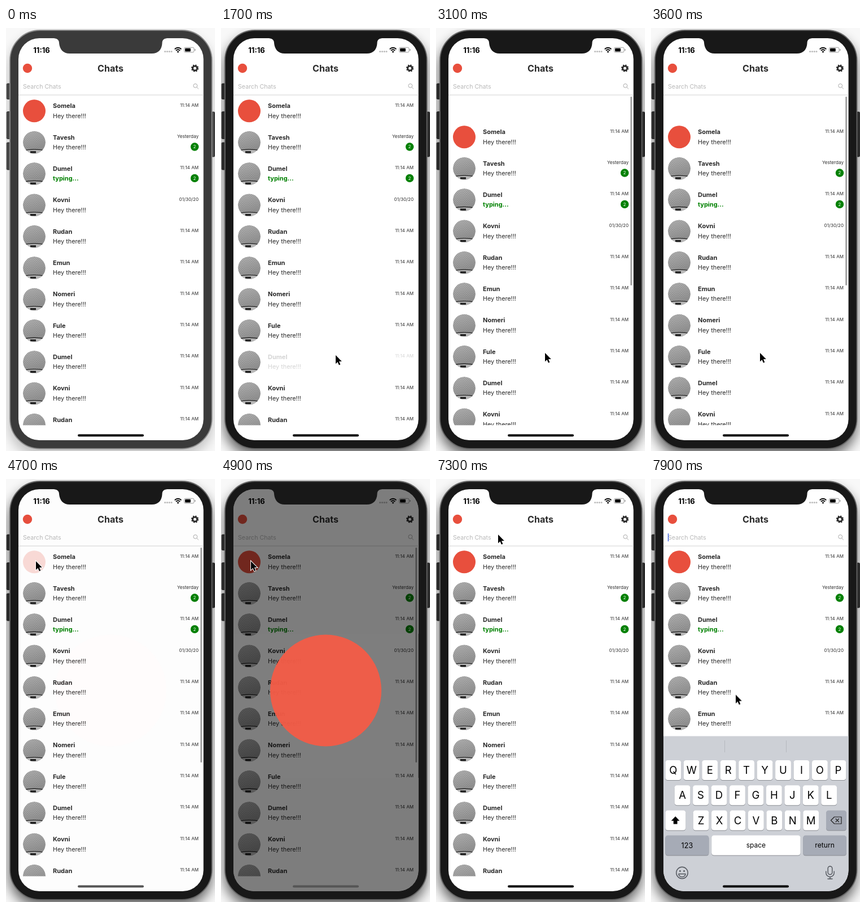
An HTML page that plays this animation: 370x746 px, repeating every 8000 ms.

```html
<!DOCTYPE html>
<html lang="en">
<head>
<meta charset="utf-8">
<title>Chats</title>
<style>
@property --s { syntax: "<length>"; inherits: true; initial-value: 0px; }
html, body { margin: 0; width: 100%; height: 100%; overflow: hidden; background: #f8f8f8; }
svg { display: block; width: 100vw; height: 100vh; font-family: Inter, Roboto, sans-serif; fill: #2a2a2a; }
.anim { animation: 8s linear infinite; }

.shadow { filter: blur(11px); animation-name: shadow; }
.body { animation-name: body; }
.side { animation-name: side; }
.glass { animation-name: glass; }
.scroll { animation-name: scroll; }
.list { transform: translateY(var(--s)); }
.bar { y: calc(121px + max(0px, var(--s) * -.65)); height: calc(379px - max(0px, var(--s))); animation-name: bar; }
.press { animation-name: press; }
.tap { animation-name: tap; }
.modal { animation-name: modal; }
.home { animation-name: home; }
.keys { animation-name: keys; }
.caret { animation-name: caret; }
.cursor { animation-name: move, show; paint-order: stroke; }

.name { font-size: 11px; font-weight: 700; }
.msg { font-size: 10.8px; }
.typing { font-size: 11px; font-weight: 700; fill: #008000; }
.time { font-size: 8px; letter-spacing: .06px; text-anchor: end; }
.badge { font-size: 8px; fill: #fff; text-anchor: middle; }
.key { text-anchor: middle; fill: #000; }

/* window gains focus */
@keyframes shadow { 0%, 15% { opacity: .24 } 15.01%, 100% { opacity: .62 } }
@keyframes body { 0%, 15% { fill: #3a3a3a; stroke: #8c8c8c } 15.01%, 100% { fill: #181818; stroke: #666 } }
@keyframes side { 0%, 15% { fill: #484848 } 15.01%, 100% { fill: #2a2a2a } }
@keyframes glass { 0%, 15% { fill: #3a3a3a } 15.01%, 100% { fill: #181818 } }

@keyframes scroll {
  0%, 21.9% { --s: 0px }
  26.9% { --s: -120px; animation-timing-function: ease-out }
  30.6%, 31.25% { --s: -151px }
  35.5% { --s: 0px; animation-timing-function: ease-out }
  38.1%, 45.6% { --s: 46px; animation-timing-function: cubic-bezier(.2, .7, .3, 1) }
  52%, 100% { --s: 0px }
}
@keyframes bar { 0%, 22% { opacity: 0 } 23%, 61.5% { opacity: 1 } 65%, 100% { opacity: 0 } }
@keyframes press { 0%, 20% { opacity: 1 } 21%, 22.5% { opacity: .2 } 24.4%, 100% { opacity: 1 } }
@keyframes tap { 0%, 57% { opacity: 1 } 58%, 59% { opacity: .2 } 61.2%, 100% { opacity: 1 } }
@keyframes modal {
  0%, 58.46% { opacity: 0; animation-timing-function: ease-in-out }
  61.6%, 71% { opacity: 1; animation-timing-function: ease-in-out }
  74.7%, 100% { opacity: 0 }
}
@keyframes home { 0%, 58.4% { fill: #000 } 58.7%, 71% { fill: #555 } 73%, 100% { fill: #000 } }
@keyframes keys {
  0%, 92.7% { transform: translateY(280px); animation-timing-function: cubic-bezier(.2, .8, .3, 1) }
  97.3%, 100% { transform: none }
}
@keyframes caret { 0%, 93% { opacity: 0 } 93.01%, 100% { opacity: 1 } }
@keyframes show { 0%, 1.24% { opacity: 0 } 1.25%, 100% { opacity: 1 } }
@keyframes move {
  0%, 1.25% { transform: translate(328px, 597px) }
  3.75%, 6.25% { transform: translate(254px, 614px) }
  8.75%, 11.25% { transform: translate(220px, 539px) }
  15%, 21.9% { transform: translate(203px, 577px) }
  26.9% { transform: translate(203px, 430px) }
  30%, 31.25% { transform: translate(193px, 330px) }
  38.1%, 45.6% { transform: translate(193px, 573px); animation-timing-function: ease-in-out }
  56.25%, 65% { transform: translate(53px, 145px); animation-timing-function: ease-in-out }
  70%, 79.4% { transform: translate(156.5px, 153.5px); animation-timing-function: ease-in-out }
  89.4%, 93.1% { transform: translate(110px, 98px); animation-timing-function: ease-in-out }
  98.1%, 100% { transform: translate(150px, 380.5px) }
}
</style>
</head>
<body>
<svg viewBox="0 0 370 746" preserveAspectRatio="none">
  <defs>
    <clipPath id="screen"><rect x="22" y="18" width="327.6" height="709" rx="37"/></clipPath>
    <clipPath id="view"><rect x="22" y="118.5" width="328" height="582"/></clipPath>
    <clipPath id="disc"><circle r="20"/></clipPath>
    <linearGradient id="grey" x1="0" y1="0" x2=".3" y2="1">
      <stop offset="0" stop-color="#bcbcbc"/><stop offset="1" stop-color="#949494"/>
    </linearGradient>
    <pattern id="mesh" width="3.2" height="4" patternUnits="userSpaceOnUse">
      <circle cx=".8" cy="1" r=".75" fill="#555"/><circle cx="2.4" cy="3" r=".75" fill="#555"/>
    </pattern>
    <g id="photo" clip-path="url(#disc)">
      <circle r="20" fill="url(#grey)"/>
      <circle r="20" fill="url(#mesh)" opacity=".65"/>
      <path d="M-20 14.5Q0 10.5 20 14.5V20H-20Z" fill="#b8b8b8"/>
      <path d="M-20 14.5Q0 10.5 20 14.5" fill="none" stroke="#222" stroke-width="1.3"/>
      <path d="M-7 15.6H3V18.8H-7Z" fill="#1c1c1c"/>
    </g>
  </defs>

  <rect width="370" height="746" fill="#f8f8f8"/>
  <rect class="anim shadow" x="6" y="16" width="358" height="738" rx="54" fill="#000"/>
  <g class="anim side" stroke="#111" stroke-width=".7">
    <rect x="1.3" y="98" width="8" height="27.5" rx="1.5"/>
    <rect x="1.3" y="147.5" width="8" height="48" rx="1.5"/>
    <rect x="1.3" y="202" width="8" height="48" rx="1.5"/>
    <rect x="361" y="148" width="8.5" height="79" rx="1.5"/>
  </g>
  <rect class="anim body" x="7" y="4" width="357.5" height="738" rx="53" stroke-width="1.8"/>

  <g clip-path="url(#screen)">
    <rect x="22" y="18" width="328" height="710" fill="#fff"/>

    <text x="63" y="43.5" text-anchor="middle" font-size="13" font-weight="700" fill="#000">11:16</text>
    <g fill="#bbb"><circle cx="281.6" cy="41.5" r="1.5"/><circle cx="285.4" cy="41.5" r="1.5"/><circle cx="289.2" cy="41.5" r="1.5"/><circle cx="293" cy="41.5" r="1.5"/></g>
    <g fill="none" stroke="#000" stroke-width="1.9">
      <path d="M298.7 37.3a8 8 0 0 1 11.6 0M300.9 39.8a5 5 0 0 1 7.2 0"/>
    </g>
    <path d="M302.4 41.7a3 3 0 0 1 4.2 0L304.5 43.8Z" fill="#000"/>
    <rect x="315.5" y="34.3" width="17.4" height="8.6" rx="2.4" fill="none" stroke="#999" stroke-width="1"/>
    <rect x="317" y="35.8" width="9.8" height="5.6" rx="1" fill="#000"/>
    <path d="M334 37a1.6 1.6 0 0 1 0 3.2Z" fill="#999"/>

    <circle cx="38" cy="71" r="8.2" fill="#e84f3d"/>
    <text x="185" y="77" text-anchor="middle" font-size="16" font-weight="650">Chats</text>
    <g fill="none" stroke="#2a2a2a">
      <circle cx="334.4" cy="71" r="3.9" stroke-width="2.8"/>
      <circle cx="334.4" cy="71" r="5.5" stroke-width="2.2" stroke-dasharray="2.4 1.92"/>
    </g>
    <text x="30" y="107.2" font-size="10.7" fill="#b9b9b9">Search Chats</text>
    <g fill="none" stroke="#aaa" stroke-width="1"><circle cx="335.2" cy="101.8" r="3.4"/><path d="M337.7 104.3L340.8 107.4"/></g>
    <rect class="anim caret" x="29.8" y="96" width="1.5" height="14" fill="#4668e0"/>
    <rect x="22" y="117.6" width="328" height="1" fill="#d4d4d4"/>

    <g class="anim scroll">
      <g clip-path="url(#view)"><g class="list" id="list"></g></g>
      <rect class="anim bar" x="344.3" width="2.6" rx="1.3" fill="#999"/>
    </g>

    <g class="anim keys" id="keys">
      <rect x="22" y="453.5" width="328" height="280" fill="#cdd0d6"/>
      <path d="M130.5 461V482M239.5 461V482" stroke="#b6b9bf" stroke-width="1"/>
    </g>

    <g class="anim modal">
      <rect x="22" y="18" width="328" height="710" fill="#000" fill-opacity=".52"/>
      <circle cx="185.5" cy="373" r="98.5" fill="#ee5a45"/>
    </g>
    <rect class="anim home" x="127" y="716.5" width="117" height="4" rx="2"/>
  </g>
  <path class="anim glass" d="M82 17V18C90 18 94 20.5 94 26.5C95 37.5 101 45 113 45H258C270 45 276 37.5 276.5 26.5C276.5 20.5 280 18 288 18V17Z"/>

  <path class="anim cursor" d="M0 0V15.2L3.5 11.9L5.9 17.4L8.3 16.4L6 11H10.8Z" fill="#000" stroke="#fff" stroke-width="2"/>
</svg>
<script>
const cycle = ["Dumel", "Kovni", "Rudan", "Emun", "Nomeri", "Fule"];
const names = ["Somela", "Tavesh", ...cycle, ...cycle, "Dumel", "Kovni"];
const times = { 1: "Yesterday", 3: "01/30/20" };
const label = (cls, x, y, str) => `<text class="${cls}" x="${x}" y="${y}">${str}</text>`;

function row(name, i) {
  const face = i ? `<use href="#photo" x="50" y="146.3"/>`
    : `<circle class="anim tap" cx="50" cy="146.3" r="20" fill="#e84f3d"/>`;
  const badge = i === 1 || i === 2
    ? `<circle cx="334" cy="154.2" r="7.2" fill="#008000"/>` + label("badge", 334, 157.1, 2) : "";
  const typing = i === 2;
  return `<g transform="translate(0 ${i * 55.35})">${face}<g class="${i === 8 ? "anim press" : ""}">` +
    label("name", 83, 141.2, name) +
    label(typing ? "typing" : "msg", 83, 158.7, typing ? "typing..." : "Hey there!!!") +
    label("time", 341, 138.5, times[i] || "11:14 AM") + badge + "</g></g>";
}
document.getElementById("list").innerHTML = names.map(row).join("");

function key(x, y, w, str = "", size = 18.5, fill = "#fff") {
  const box = (dy, color) => `<rect x="${x}" y="${y + dy}" width="${w}" height="35" rx="4.3" fill="${color}"/>`;
  return box(1, "#8b8e94") + box(0, fill) +
    `<text class="key" x="${x + w / 2}" y="${y + 17.6 + size * .36}" font-size="${size}">${str}</text>`;
}
const line = (str, x, y) => [...str].map((c, i) => key(x + i * 32.45, y, 27.8, c)).join("");
const dark = "#a6abb6";

document.getElementById("keys").innerHTML +=
  line("QWERTYUIOP", 25.4, 496) + line("ASDFGHJKL", 41.7, 540.2) + line("ZXCVBNM", 74.6, 584.4) +
  key(25.4, 584.4, 36) + key(310, 584.4, 36, "", 12, dark) +
  key(25.4, 628.4, 77, "123", 12.6, dark) + key(107.2, 628.4, 157.4, "space", 12) +
  key(269.2, 628.4, 76.8, "return", 12.2, dark) +
  `<path d="M43.2 595L50.6 602.8H46.6V608.4H39.8V602.8H35.8Z" fill="#000"/>
  <g fill="none" stroke="#222" stroke-width="1.2" stroke-linejoin="round">
    <path d="M318.5 602L324.5 596H337V608H324.5ZM326.8 599L332.8 605M332.8 599L326.8 605"/>
  </g>
  <g fill="none" stroke="#50545b" stroke-width="1.4" stroke-linecap="round">
    <circle cx="55" cy="694.5" r="10.2"/>
    <path d="M49 696.5H61A6 5.2 0 0 1 49 696.5Z"/>
    <rect x="313.2" y="683" width="7.6" height="14.5" rx="3.8"/>
    <path d="M309.8 692V694.5A7.2 7.2 0 0 0 324.2 694.5V692M317 701.8V705M313 705.2H321"/>
  </g>
  <g fill="#50545b"><circle cx="51.4" cy="691.5" r="1.4"/><circle cx="58.6" cy="691.5" r="1.4"/></g>`;
</script>
</body>
</html>
```
